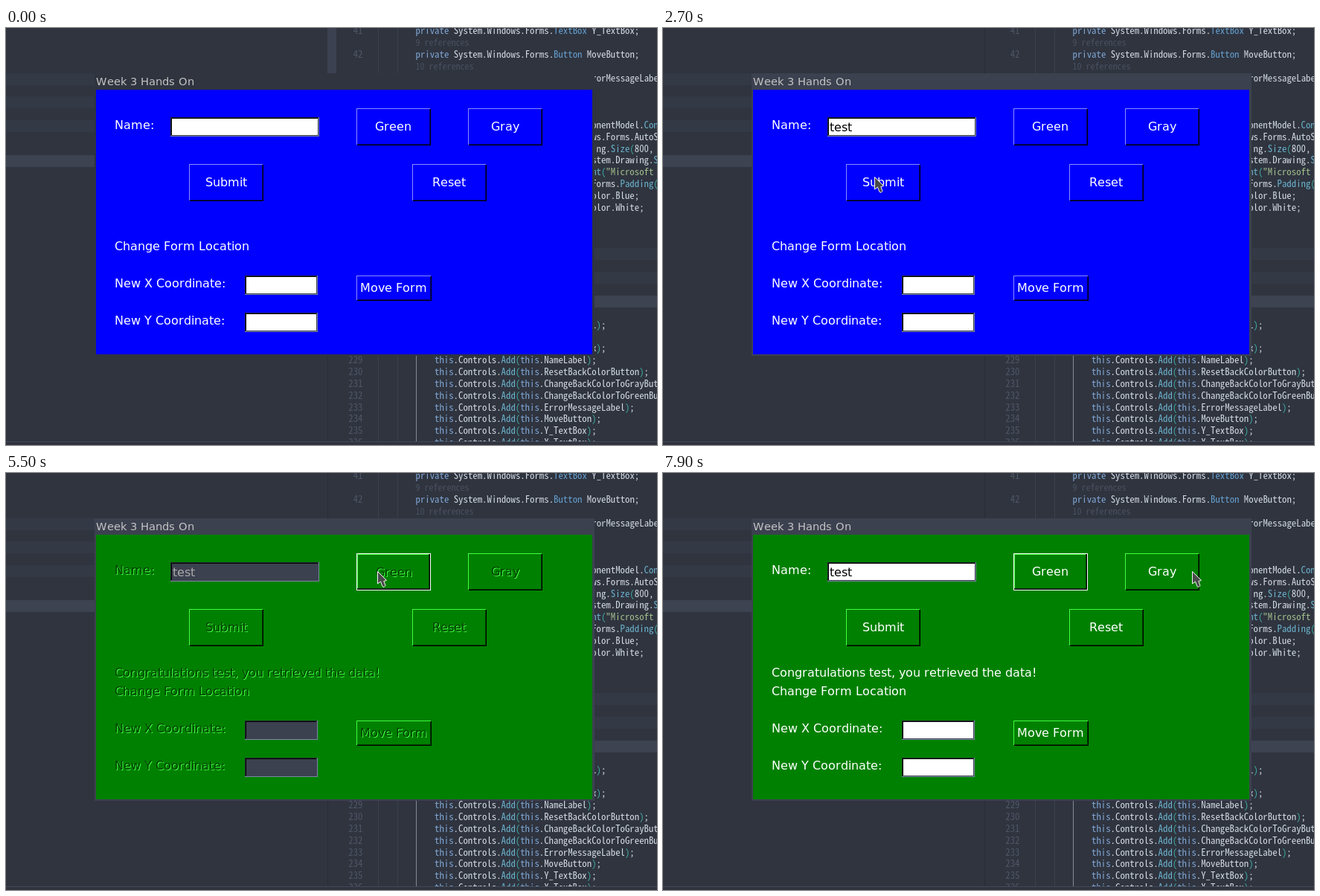
Animation of 875 by 561 pixels, one loop 8 s. Source, as an HTML page:

```html
<!DOCTYPE html>
<html lang="en">
<head>
<meta charset="utf-8">
<title>Form demo</title>
<style>
  html, body { margin: 0; width: 100%; height: 100%; overflow: hidden; background: #2f343f; }
  svg { display: block; width: 875px; height: 561px; font: 16px "DejaVu Sans", sans-serif; }
  text { white-space: pre; }

  /* editor */
  .code { font: 12.8px "Noto Sans Mono CJK JP", "Noto Sans Mono", monospace; letter-spacing: var(--gap, 0); fill: #d3dae3; }
  .code .kw { fill: #7fa5d2; }
  .code .type { fill: #659fce; }
  .code .fn { fill: #6cb2cc; }
  .code .par { fill: #3fa7a0; }
  .code .str { fill: #a3be8c; }
  .code.num { fill: #4f5666; text-anchor: end; }
  .code.ref { font-size: 12px; fill: #4a5160; }
  .thumb { fill: #3b4150; animation: thumb 8s linear infinite; }
  @keyframes thumb { 0%, 5% { opacity: 1; } 9%, 99.9% { opacity: 0; } }

  /* form */
  svg { --back: #00f; --light: #8c8cff; --dark: #000080; }
  svg.green { --back: #008000; --light: #42ff42; --dark: #003c00; }
  .frame { fill: #2f343f; }
  .active .frame { fill: #3c4150; }
  .title { font-size: 14.67px; fill: #c3c3c3; }
  .back { fill: var(--back); }
  .lit { fill: var(--light); }
  .dim { fill: var(--dark); }
  .label { fill: #fff; }
  .off .label { fill: var(--dark); filter: drop-shadow(1px 1px 0 var(--light)); }
  .ring { fill: none; stroke: #fff; display: none; }
  .focus .ring, .press .ring { display: block; }
  .focus .edge { transform: translate(1px, 1px); }
  .focus .far { transform: translate(-1px, -1px); }
  .press .edge, .press .far { display: none; }
  .press text { transform: translate(1px, 1px); }
  .field { fill: #fff; }
  .value { fill: #000; }
  .off .field { fill: #3c4150; }
  .off .value { fill: #a9a9a9; }
  .dialog { font-size: 11px; fill: #d6d6d6; }
</style>
</head>
<body>
<svg id="stage" viewBox="0 0 875 561">
  <rect width="875" height="561" fill="#2f343f"/>
  <g id="editor"></g>
  <rect class="thumb" x="432" width="12" height="61"/>
  <path d="M0 556h875v5H0z" fill="#2f343f"/>
  <path d="M0 556.5h875" stroke="#434957"/>

  <rect class="frame" x="119" y="61" width="672" height="380"/>
  <rect class="back" x="121" y="83" width="667" height="356"/>
  <g id="form"></g>
  <g id="message"></g>
  <g id="value"></g>
  <rect id="caret" y="124" width="1" height="19"/>

  <g id="dialog">
    <rect x="330" y="179" width="226" height="76" fill="#3c4150"/>
    <rect x="403.500" y="221.500" width="85" height="22" fill="none" stroke="#e6e6e6"/>
    <g id="note"></g>
    <g id="ok"></g>
  </g>

  <path id="arrow" d="M.5 .5V17L4.500 14L7 20.500L9 21.500L11 19.500L8.800 13.500L12.500 12.500Z" fill="#4a4a4a" stroke="#f4f4f4"/>
  <path id="beam" d="M-3 -7.500h2.500l.5 .5l.5 -.5H3M0 -7V7M-3 7.500h2.500l.5 -.5l.5 .5H3" fill="none" stroke="#333"/>
</svg>

<script>
const $ = id => document.getElementById(id);
const rect = (cls, x, y, w, h) => `<rect class="${cls}" x="${x}" y="${y}" width="${w}" height="${h}"/>`;
const fill = (color, x, y, w, h) => `<rect fill="${color}" x="${x}" y="${y}" width="${w}" height="${h}"/>`;
const text = (cls, x, y, s) => `<text class="${cls}" x="${x}" y="${y}">${s}</text>`;

const pen = document.createElement("canvas").getContext("2d");
function advance(family, char) {
  pen.font = `100px ${family}`;
  return pen.measureText(char).width / 100;
}

// ---- text on whole-pixel advances, as the form toolkit sets it ----
const steps = (s, size) => [...s].map(c => Math.round(advance('"DejaVu Sans", sans-serif', c) * size));
const widthOf = (s, size = 16) => steps(s, size).reduce((a, b) => a + b, 0);

function snapped(cls, x, y, s, size = 16) {
  const xs = steps(s, size).map(w => (x += w) - w);
  return text(cls, xs.join(" "), y, s);
}
const centered = (cls, x, y, s, size) =>
  snapped(cls, Math.floor(x - widthOf(s, size) / 2), y, s, size);

// ---- editor behind the form ----
const rowY = row => 8.3 + row * 15.82;

function paint(line) {
  const token = /("[^"]*"?)|\b(this|private|new)\b|\b(TextBox|Button|Label)(?= )|(\w+)(?=\()|([()])/g;
  const names = ["str", "kw", "type", "fn", "par"];
  return line.replace(token, (all, ...groups) =>
    `<tspan class="${names[groups.slice(0, 5).findIndex(Boolean)]}">${all}</tspan>`);
}

const fields = [[0, "TextBox Y_TextBox"], [2, "Button MoveButton"], [4, "Label ErrorMessageLabel"]]
  .map(([row, s]) => [row, 550.5, `private System.Windows.Forms.${s};`]);
const setup = [
  "components = new System.ComponentModel.Container()",
  "AutoScaleMode = System.Windows.Forms.AutoScaleMode.Font",
  "ClientSize = new System.Drawing.Size(800, 450)",
  "AutoScaleDimensions = new System.Drawing.SizeF(9F, 20F)",
  'Font = new System.Drawing.Font("Microsoft Sans Serif", 12F)',
  "Margin = new System.Windows.Forms.Padding(4)",
  "BackColor = System.Drawing.Color.Blue",
  "ForeColor = System.Drawing.Color.White"
].map((s, i) => [8 + i, 576, `this.${s};`]);
const adds = ["XCoordLabel", "YLabel", "NameTextBox", "NameLabel", "ResetBackColorButton",
  "ChangeBackColorToGrayButton", "ChangeBackColorToGreenButton", "ErrorMessageLabel",
  "MoveButton", "Y_TextBox", "X_TextBox"
].map((s, i) => [25 + i, 576, `this.Controls.Add(this.${s});`]);

function editor() {
  let out = "";
  for (const y of [61, 92, 124]) out += fill("#343946", 0, y, 432, 16);
  out += fill("#3e4352", 0, 171, 432, 16);
  for (const y of [296, 328]) out += fill("#343946", 444, y, 431, 16);
  out += fill("#3e4352", 444, 360, 431, 16);
  out += fill("#292d37", 432, 0, 1, 556);
  for (const x of [500, 526]) out += fill("#3b404d", x, 0, 1, 61) + fill("#3b404d", x, 441, 1, 115);
  out += fill("#858b96", 551, 441, 1, 115);
  for (const [row, x, s] of [...fields, ...setup, ...adds]) out += text("code", x, rowY(row), paint(s));
  out += text("code ref", 550.5, rowY(1), "9 references") + text("code ref", 550.5, rowY(3), "10 references");
  out += text("code num", 479.5, rowY(0), 41) + text("code num", 479.5, rowY(2), 42);
  for (let row = 28; row < 36; row++) out += text("code num", 479.5, rowY(row), 201 + row);
  return out;
}

// keep the code on a half-em pitch whichever monospace font is found
const mono = '"Noto Sans Mono CJK JP", "Noto Sans Mono", monospace';
$("stage").style.setProperty("--gap", 0.5 - advance(mono, "m") + "em");
$("editor").innerHTML = editor();

// ---- form controls ----
function button(id, x, y, w, h, caption) {
  return `<g id="${id}">
    <g class="edge">${rect("lit", x, y, w - 1, 1)}${rect("lit", x, y, 1, h - 1)}</g>
    <g class="far">${rect("dim", x + 1, y + h - 2, w - 2, 1)}${rect("dim", x + w - 2, y + 1, 1, h - 2)}
      ${fill("#000", x + 1, y + h - 1, w - 1, 1)}${fill("#000", x + w - 1, y + 1, 1, h - 1)}</g>
    ${rect("ring", x + .5, y + .5, w - 1, h - 1)}
    ${centered("label", x + w / 2, y + h / 2 + 5, caption)}</g>`;
}

function field(x, y, w, h) {
  return fill("#7c86a4", x, y, w, h) + fill("#23262f", x, y, w - 1, h - 1) +
    fill("#3c4150", x + 1, y + 1, w - 2, h - 2) + fill("#000", x + 1, y + 1, w - 3, h - 3) +
    rect("field", x + 2, y + 2, w - 4, h - 4);
}

$("form").innerHTML =
  snapped("title", 121, 77, "Week 3 Hands On", 14.67) +
  [["Name:", 136], ["Change Form Location", 299], ["New X Coordinate:", 349], ["New Y Coordinate:", 399]]
    .map(([s, y]) => snapped("label", 146, y, s)).join("") +
  field(221, 120, 200, 26) + field(321, 333, 98, 26) + field(321, 383, 98, 26) +
  button("greenButton", 471, 108, 100, 50, "Green") +
  button("grayButton", 621, 108, 100, 50, "Gray") +
  button("submit", 246, 183, 100, 50, "Submit") +
  button("reset", 546, 183, 100, 50, "Reset") +
  button("move", 471, 333, 101, 34, "Move Form");
$("message").innerHTML = snapped("label", 146, 274, "Congratulations test, you retrieved the data!");
$("note").innerHTML = centered("dialog", 444, 202, "Color selection was: Color [Green]", 11);
$("ok").innerHTML = centered("dialog", 447, 237, "OK", 11);

// ---- timeline ----
const LOOP = 8000, TICK = 100;
const path = [ // time, x, y
  [400, 49, 190], [1200, 264, 135], [2600, 264, 135], [2700, 284, 200], [2900, 283, 203],
  [4400, 283, 203], [4600, 450, 182], [4700, 450, 182], [5200, 499, 132], [6000, 499, 132],
  [6600, 450, 231], [7100, 450, 231], [7500, 762, 111], [7700, 762, 111], [7900, 711, 132]
];

function pointer(t) {
  const i = path.findIndex(p => p[0] >= t);
  if (i <= 0) return path[0].slice(1);
  const [t0, x0, y0] = path[i - 1], [t1, x1, y1] = path[i];
  const k = (t - t0) / (t1 - t0);
  return [Math.round(x0 + (x1 - x0) * k), Math.round(y0 + (y1 - y0) * k)];
}

const within = (t, from, to) => t >= from && t < to;
const show = (id, on) => { $(id).style.display = on ? "" : "none"; };
const mark = (id, cls, on) => $(id).classList.toggle(cls, on);

function draw(t) {
  const [x, y] = pointer(t);
  const modal = within(t, 6000, 7000);
  const inField = within(x, 222, 420) && within(y, 121, 146);

  mark("stage", "active", t >= 400 && x >= 119 && !modal);
  mark("stage", "green", t >= 5500);
  mark("stage", "off", within(t, 5500, 7000));
  mark("submit", "focus", within(t, 3500, 5400));
  mark("greenButton", "press", t === 5400);
  mark("greenButton", "focus", t >= 5500);
  // the caption stays pushed in until the dialog takes over
  $("greenButton").querySelector("text").style.transform = within(t, 5400, 6000) ? "translate(1px, 1px)" : "";

  const count = t < 1800 ? 0 : t < 2000 ? 1 : Math.min(4, 2 + (t - 2000) / TICK);
  const typed = "test".slice(0, count);
  $("value").innerHTML = snapped("value", 224, 139, typed);
  $("caret").setAttribute("x", 224 + widthOf(typed));
  show("caret", within(t, 1400, 2700) || within(t, 3300, 3500));

  show("message", t >= 3500);
  show("dialog", modal);
  mark("ok", "press", within(t, 6800, 7000));

  show("arrow", t >= 400 && !inField);
  show("beam", t >= 400 && inField);
  $("arrow").setAttribute("transform", `translate(${x} ${y})`);
  $("beam").setAttribute("transform", `translate(${x - .5} ${y})`);
}

let last = -1;
function loop(now) {
  const t = Math.floor((now % LOOP) / TICK) * TICK;
  if (t !== last) draw(last = t);
  requestAnimationFrame(loop);
}
draw(0);
requestAnimationFrame(loop);
</script>
</body>
</html>
```
